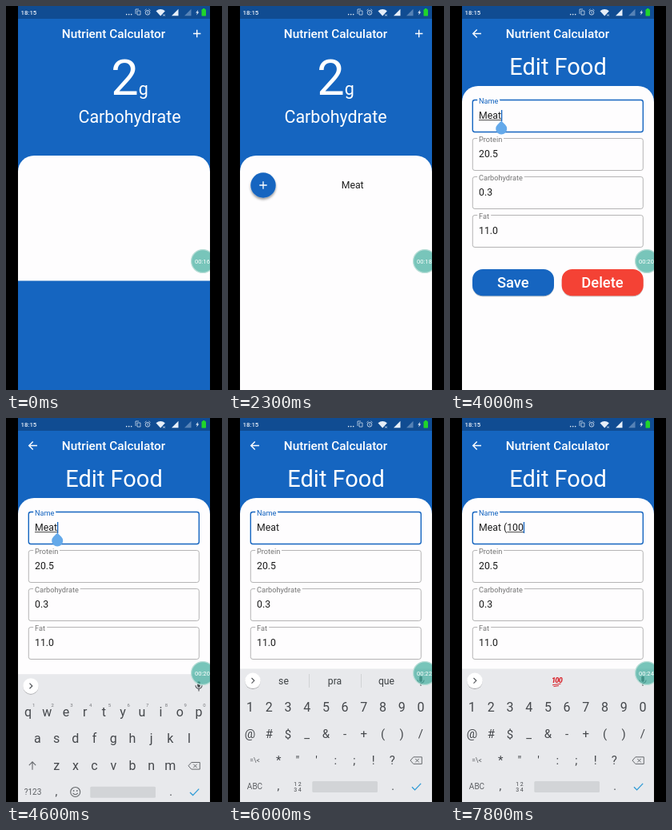
These frames come from a looping animation (270x480 px, 8000 ms). An HTML page:

```html
<!DOCTYPE html>
<html lang="en">
<head>
<meta charset="utf-8">
<title>Nutrient Calculator</title>
<style>
  html, body { margin: 0; width: 100%; height: 100%; overflow: hidden; background: #000; }
  svg { display: block; width: 100vw; height: 100vh; }
  text { font-family: Roboto, "Noto Sans", sans-serif; white-space: pre; }
</style>
</head>
<body>
<svg id="stage" viewBox="0 0 270 480"></svg>
<script>
const LOOP = 8000, STEP = 100;
const BLUE = '#1565c0', SHEET = '#fefdfe', INK = '#1c1c1c', KEY = '#45484c', BOARD = '#e8e9ec';

const text = (s, x, y, size, fill, extra = '') =>
  `<text x="${x}" y="${y}" font-size="${size}" fill="${fill}" ${extra}>${s}</text>`;
const mid = (s, x, y, size, fill, extra = '') => text(s, x, y, size, fill, `text-anchor="middle" ${extra}`);
const rect = (x, y, w, h, fill, extra = '') =>
  `<rect x="${x}" y="${y}" width="${w}" height="${h}" fill="${fill}" ${extra}/>`;
const circle = (x, y, r, fill, extra = '') => `<circle cx="${x}" cy="${y}" r="${r}" fill="${fill}" ${extra}/>`;
const line = (d, stroke, width, extra = '') =>
  `<path d="${d}" fill="none" stroke="${stroke}" stroke-width="${width}" ${extra}/>`;
const group = (id, body, extra = '') => `<g id="${id}" ${extra}>${body}</g>`;
const medium = 'font-weight="500"';
const escapeKey = s => s.replace('&', '&amp;').replace('<', '&lt;');

function sheet(top, bottom, id) {
  return `<path id="${id}" d="${sheetPath(top, bottom)}" fill="${SHEET}"/>`;
}
function sheetPath(top, bottom) {
  return `M15 ${bottom}V${top + 20}a20 20 0 0 1 20-20H235a20 20 0 0 1 20 20V${bottom}Z`;
}

function statusBar() {
  const white = '#e6eef8';
  return rect(0, 0, 270, 16, '#104c92')
    + text('18:15', 18.5, 11.2, 7.8, white, medium)
    + [151, 154, 157].map(x => circle(x - .3, 10.6, .8, white)).join('')
    + line('M164 6h4v5h-4zM162 10V4h4', white, .7)
    + circle(177, 8.3, 2.8, 'none', `stroke="${white}" stroke-width=".8"`)
    + line('M177 6.7v2l1 .7M173.5 5.5l2-1.6M180.5 5.5l-2-1.6', white, .7)
    + `<path d="M187.5 6.2q5.7-4.4 11.4 0l-5.7 6.3z" fill="${white}"/>`
    + line('M196 10.5l3 2M199 10.5l-3 2', white, .6)
    + `<path d="M207 12.3l8.5-8.5v8.5z" fill="${white}"/>`
    + '<path d="M223 12.3l8.5-8.5v8.5z" fill="#5682b6"/>'
    + `<path d="M240.2 4.8l-3 3.8h1.8l-.8 3 3-4h-1.8z" fill="${white}"/>`
    + rect(244.5, 4, 5.5, 8.6, '#20d52b', 'rx="1.2"') + rect(246, 3, 2.5, 1.2, '#20d52b');
}

function nutrient(amount, name, x) {
  return mid(`${amount}<tspan font-size="21.47">g</tspan>`, x, 111, 61.33, '#fff')
    + mid(name, x, 145.6, 21.47, '#fff');
}

function mainPage() {
  return rect(0, 53, 270, 427, BLUE)
    + group('carousel', nutrient(2, 'Carbohydrate', 134.5) + nutrient(21, 'Protein', 326.5))
    + line('M234 34.5h9.4M238.7 29.8v9.4', '#fff', 1.4)
    + sheet(187, 480, 'mainSheet')
    + group('foodRow', circle(44, 224, 15.7, BLUE, 'filter="url(#shadow)"')
      + line('M39.3 224h9.4M44 219.3v9.4', '#fff', 1.3)
      + mid('Meat', 155.7, 228, 12.27, INK));
}

function field(label, value, row) {
  const y = 117.5 + row * 48;
  return `<rect class="border" x="28.3" y="${y}" width="213" height="40" rx="2.7" fill="none"/>`
    + text(label, 36, y + 4.1, 9.2, '#757575',
      `class="label" stroke="${SHEET}" stroke-width="5" paint-order="stroke"`)
    + text(value, 36, y + 23.4, 12.27, INK, 'class="value"');
}

function button(label, x, fill) {
  return rect(x, 329, 102, 33.3, fill, 'rx="13" filter="url(#lowShadow)"')
    + mid(label, x + 50.8, 352.3, 18.4, '#fff', medium);
}

function editPage() {
  return rect(0, 16, 270, 464, BLUE)
    + line('M39 34.5H28.8M33.7 29.5l-5 5 5 5', '#fff', 1.4)
    + mid('Edit Food', 135, 86.3, 29, '#fff')
    + sheet(100, 480, 'editSheet')
    + [['Name', 'Meat'], ['Protein', '20.5'], ['Carbohydrate', '0.3'], ['Fat', '11.0']]
      .map(([label, value], i) => field(label, value, i)).join('')
    + group('underline', '', '') + rect(64, 130, 1.3, 14, BLUE, 'id="cursor"')
    + '<path id="handle" d="M64.2 143.6l4.95 4.95a7 7 0 1 1-9.9 0z" fill="#64a9ea"/>'
    + button('Save', 28, BLUE) + button('Delete', 139.7, '#f44336');
}

// Horizontal pitch of the keys is the same in every row.
const keyX = i => 27.6 + i * 23.7;
const keyRow = (chars, first, y, size = 16) =>
  [...chars].map((c, i) => mid(escapeKey(c), keyX(first + i), y, size, KEY)).join('');

function keyboard() {
  const hints = [...'1234567890'].map((c, i) => mid(c, keyX(i) + 7, 354.5, 6, '#77797d')).join('');
  const letters = keyRow('qwertyuiop', 0, 366) + hints + keyRow('asdfghjkl', .5, 399.7)
    + keyRow('zxcvbnm', 1.5, 433)
    + line('M33 433v-9.5M28.8 427.4l4.2-4.2 4.2 4.2', '#66696d', 1.1)
    + mid('?123', 33.5, 464.3, 10, '#5c5f63')
    + circle(86.7, 460.8, 6, 'none', 'stroke="#66696d" stroke-width="1.1"')
    + circle(84.6, 459.2, .9, '#66696d') + circle(88.8, 459.2, .9, '#66696d')
    + line('M83.6 462.3q3.1 3.6 6.2 0', '#66696d', 1.1);
  const symbols = keyRow('1234567890', 0, 366.5) + keyRow('@#$_&-+()/', 0, 400, 15)
    + mid('=\\&lt;', 33.5, 431, 8.5, '#5c5f63') + keyRow('*"\':;!?', 1.5, 433.3, 15)
    + mid('ABC', 33.5, 464.3, 10, '#5c5f63')
    + mid('1 2', 87, 460, 7, KEY) + mid('3 4', 87, 467, 7, KEY);
  return rect(0, 313.5, 270, 167, BOARD)
    + circle(31, 328.3, 9.7, '#fff', 'filter="url(#lowShadow)"')
    + line('M29.5 325l3.3 3.3-3.3 3.3', '#55585c', 1.2)
    + group('suggestions', line('M101.5 320v17M166.5 320v17', '#cbcdd0', .8)
      + [69.5, 133.5, 198].map(x => mid('', x, 333, 12.2, '#3c4043')).join(''))
    + group('hundred', mid('100', 133.5, 331, 9, '#d9282f',
      'font-weight="900" font-style="italic" letter-spacing="-.7"')
      + line('M128 333.8l10.5-1.6M129.5 335.6l6.5-1', '#d9282f', 1))
    + rect(239.2, 322.5, 3.6, 7.5, '#43464a', 'rx="1.8"')
    + line('M237 327.5a4 4 0 0 0 8 0M241 331.8v3', '#43464a', 1.1)
    + group('letters', letters) + group('symbols', symbols)
    + line('M231.8 423.8h10.5v8.6h-10.5l-3.8-4.3zM234.3 426l4.4 4.4M238.7 426l-4.4 4.4', '#66696d', 1)
    + mid(',', 63, 465, 14, KEY) + mid('.', 206, 465, 14, KEY)
    + rect(105.3, 454, 81.7, 14, '#d2d4d7', 'id="space" rx="1.5"')
    + line('M230 461.3l3.6 3.6 7.6-8', '#2e9bd6', 1.3)
    + group('popup', rect(-11.5, -44, 23, 60, '#fafafa', 'rx="3" filter="url(#lowShadow)"')
      + mid('', 0, -23, 18, KEY));
}

const stage = document.getElementById('stage');
stage.innerHTML = `<defs>
    <filter id="shadow" x="-40%" y="-40%" width="180%" height="190%">
      <feDropShadow dx="0" dy="2.2" stdDeviation="1.8" flood-opacity=".4"/></filter>
    <filter id="lowShadow" x="-20%" y="-20%" width="140%" height="150%">
      <feDropShadow dx="0" dy="1" stdDeviation=".7" flood-opacity=".3"/></filter>
  </defs>`
  + rect(0, 0, 270, 480, BLUE)
  + group('mainPage', mainPage()) + group('editPage', editPage())
  + mid('Nutrient Calculator', 134.5, 39.6, 15.33, '#fff', medium)
  + statusBar() + group('keyboard', keyboard())
  + circle(246, 319, 14.4, '#44af9f', 'fill-opacity=".72" stroke="#b7ddd6" stroke-width="1.3"')
  + text('', 236, 321.7, 7.6, '#fff', 'id="timer"')
  + rect(0, 0, 15, 480, '#000') + rect(255, 0, 15, 480, '#000');

const $ = id => document.getElementById(id);
const show = (id, on) => $(id).setAttribute('display', on ? 'inline' : 'none');
const move = (id, x, y) => $(id).setAttribute('transform', `translate(${x} ${y})`);
const clamp = v => Math.max(0, Math.min(1, v));
const latest = (steps, t) => steps.filter(s => t >= s[0]).pop();

const borders = [...stage.querySelectorAll('.border')];
const nameLabel = stage.querySelector('.label');
const nameValue = stage.querySelector('.value');
const words = [...$('suggestions').querySelectorAll('text')];
const popupChar = $('popup').querySelector('text');

// start, content, caret x, underlined span
const typing = [
  [0, 'Meat', 64.2, 36, 64.2],
  [5200, 'Meat ', 67.2, 0, 0],
  [6600, 'Meat (', 71.3, 0, 0],
  [7100, 'Meat (1', 78.2, 71.3, 78.2],
  [7400, 'Meat (10', 85.1, 71.3, 85.1],
  [7700, 'Meat (100', 92, 71.3, 92]
];
const predictions = [
  [0, ['', '', '']],
  [4900, ['Meat', 'Mestre', 'Mestrado']],
  [5300, ['se', 'pra', 'que']],
  [7100, ['', '', '']]
];
// start, end, key, x, y
const presses = [
  [6500, 6700, '(', keyX(7), 395],
  [7300, 7500, '0', keyX(9), 361],
  [7600, 7800, '0', keyX(9), 361]
];

function drawMain(t) {
  const settle = 20 * (1 - clamp(t / 300)) ** 2;
  const swipe = -169 * Math.sin(clamp((t - 2400) / 600) * Math.PI / 2) ** 1.3;
  move('carousel', settle + swipe, 0);
  $('mainSheet').setAttribute('d', sheetPath(187, t < 100 ? 343.5 : 480));
  show('foodRow', t >= 200);
}

function drawEdit(t) {
  show('editPage', t >= 3200);
  $('editPage').setAttribute('opacity', t < 3300 ? .75 : 1);
  const focused = t >= 3700;
  borders.forEach((b, i) => {
    const active = focused && i === 0;
    b.setAttribute('stroke', active ? BLUE : '#9c9c9c');
    b.setAttribute('stroke-width', active ? 1.4 : .75);
  });
  nameLabel.setAttribute('fill', focused ? BLUE : '#757575');

  const [, content, caret, from, to] = latest(typing, t);
  nameValue.textContent = content;
  $('underline').innerHTML = focused && to ? line(`M${from} 142.6H${to}`, INK, .8) : '';
  $('cursor').setAttribute('x', caret - .2);
  show('cursor', focused && !(t >= 5700 && t < 6200));
  show('handle', t >= 3900 && t < 5200);
}

function drawKeyboard(t) {
  show('keyboard', t >= 4300);
  move('keyboard', 0, 167 * (1 - clamp((t - 4200) / 500)) ** 2);
  show('letters', t < 6000);
  show('symbols', t >= 6000);
  const list = latest(predictions, t)[1];
  words.forEach((w, i) => { w.textContent = list[i]; });
  show('suggestions', list[0] !== '');
  show('hundred', t >= 7700);
  $('space').setAttribute('fill', t >= 5100 && t < 5200 ? '#b9bbbe' : '#d2d4d7');
  const press = presses.find(p => t >= p[0] && t < p[1]);
  show('popup', press);
  if (press) {
    popupChar.textContent = press[2];
    move('popup', press[3], press[4]);
  }
}

function render(time) {
  const t = Math.floor((time % LOOP) / STEP) * STEP;
  drawMain(t);
  drawEdit(t);
  drawKeyboard(t);
  $('timer').textContent = `00:${16 + Math.floor((t + 300) / 1000)}`;
}

const start = performance.now();
function tick() {
  render(performance.now() - start);
  requestAnimationFrame(tick);
}
tick();
</script>
</body>
</html>
```
